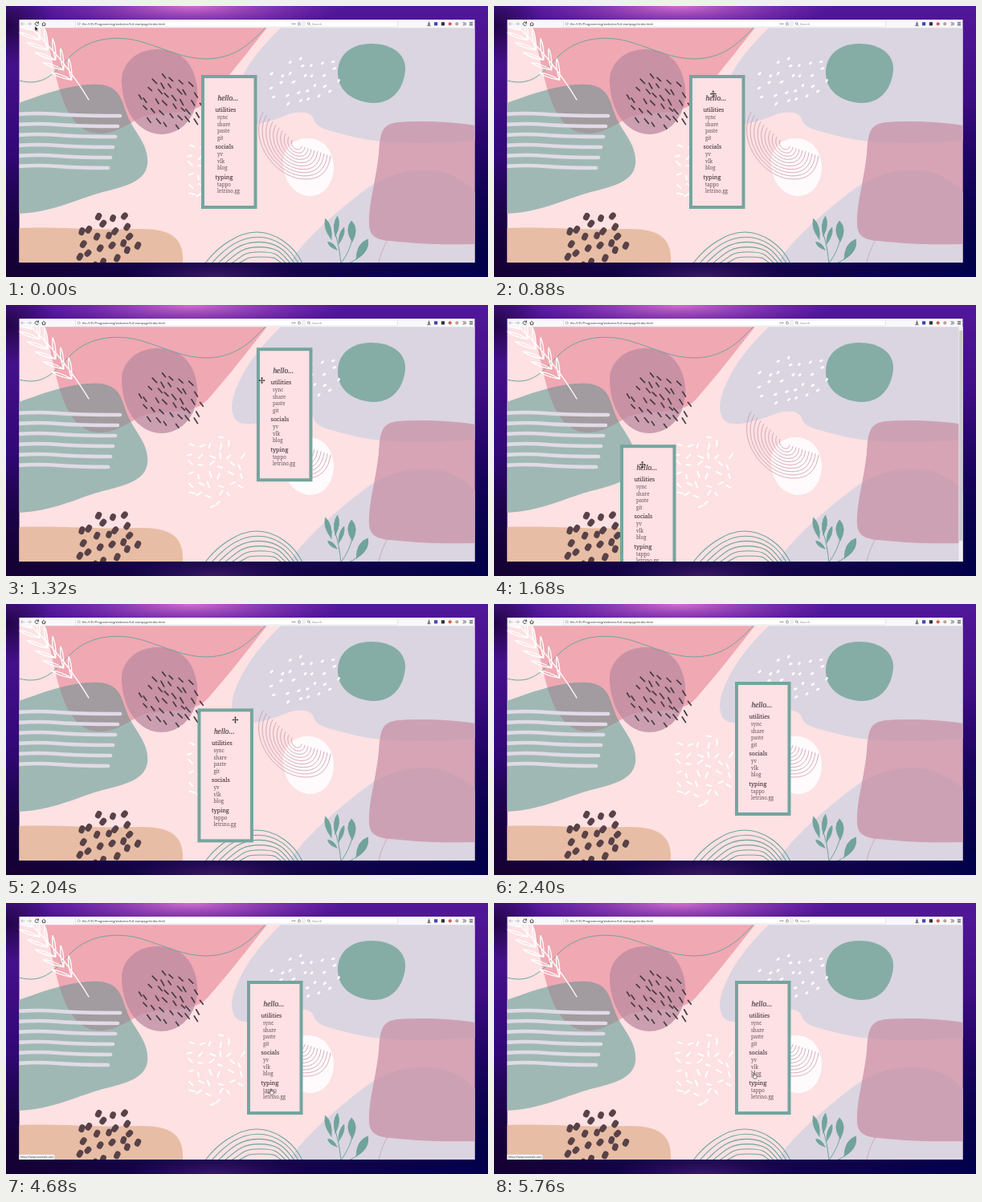
An HTML page that plays this animation: 600x338 px, repeating every 5800 ms.

```html
<!DOCTYPE html>
<html lang="en">
<head>
<meta charset="utf-8">
<title>Start page</title>
<style>
html, body { margin: 0; width: 100%; height: 100%; overflow: hidden; background: #180652; }
svg { display: block; width: 100vw; height: 100vh; }
.ui { font: 3.85px "Open Sans", "Noto Sans", sans-serif; fill: #333; }
.hello { font: italic 9.3px "Liberation Serif", serif; fill: #3f3338; stroke: #3f3338; stroke-width: .15; }
.head { font: 7.2px "Noto Serif", serif; fill: #4a363c; stroke: #4a363c; stroke-width: .1; }
.link { font: 6.2px "Noto Serif", serif; fill: #66525a; }
.line { fill: none; stroke-linecap: round; stroke-linejoin: round; }
</style>
</head>
<body>
<svg viewBox="0 0 600 338" preserveAspectRatio="none">
  <defs>
    <linearGradient id="sky" x2="0" y2="1">
      <stop offset="0" stop-color="#52179a"/><stop offset=".5" stop-color="#34087a"/><stop offset="1" stop-color="#120446"/>
    </linearGradient>
    <radialGradient id="glow"><stop offset="0" stop-color="#d070cc"/><stop offset="1" stop-color="#a040c0" stop-opacity="0"/></radialGradient>
    <radialGradient id="navy"><stop offset="0" stop-color="#02004a"/><stop offset="1" stop-color="#02004a" stop-opacity="0"/></radialGradient>
    <radialGradient id="dusk"><stop offset="0" stop-color="#150032"/><stop offset="1" stop-color="#150032" stop-opacity="0"/></radialGradient>
    <clipPath id="page"><path d="M16.5 27H583.5V320H16.5Z"/></clipPath>
    <path id="salmon" d="M48 27H325C302 56 276 90 250 119C233 138 190 130 168 139C148 149 136 160 114 159C76 156 66 104 58 70Q54 50 48 27Z"/>
    <path id="sage" d="M16 121C42 112 82 96 116 98C142 100 144 118 150 134C157 155 179 172 176 198C172 223 140 226 110 235C80 245 55 257 16 259Z"/>
    <clipPath id="inSalmon"><use href="#salmon"/></clipPath>
  </defs>

  <rect width="600" height="338" fill="url(#sky)"/>
  <ellipse cx="230" cy="0" rx="190" ry="32" fill="url(#glow)"/>
  <ellipse cx="0" cy="25" rx="60" ry="50" fill="url(#dusk)" opacity=".8"/>
  <ellipse cx="0" cy="338" rx="190" ry="150" fill="url(#dusk)"/>
  <ellipse cx="600" cy="320" rx="230" ry="210" fill="url(#navy)"/>
  <ellipse cx="260" cy="338" rx="110" ry="24" fill="url(#glow)" opacity=".2"/>

  <g clip-path="url(#page)">
    <rect x="16" y="27" width="568" height="294" fill="#fde1e3"/>
    <path fill="#dad5e1" d="M342 27C322 47 305 66 293 90C282 111 278 128 284 140C292 157 330 144 352 135C369 130 380 133 383 141C386 153 402 155 424 161C455 170 500 174 584 168V27Z"/>
    <path fill="#dad5e1" d="M352 321C370 293 405 262 446 230C477 206 522 198 552 210Q573 219 584 232V321Z"/>
    <use href="#salmon" fill="#f0a8b3"/>
    <use href="#sage" fill="#a0b8b4"/>
    <use href="#sage" fill="#a29b9f" clip-path="url(#inSalmon)"/>
    <path fill="#bd8ba0" opacity=".76" d="M144 95C143 70 165 53 190 54C220 56 234 72 238 101C241 133 222 160 193 160C163 159 145 129 144 95Z"/>
    <path fill="#e8bda5" d="M16 277C60 275 115 280 168 278C209 278 222 292 220 321H16Z"/>
    <path fill="#85ada6" d="M413 85C412 61 430 47 454 47C481 47 498 60 497 80C495 105 479 122 456 121C431 119 414 106 413 85Z"/>
    <path fill="#fffbfc" d="M345 197C344 177 360 164 377 165C397 166 408 182 408 202C407 222 396 237 378 237C358 235 346 219 345 197Z"/>
    <g id="art" class="line"></g>
    <path fill="#c98fa5" opacity=".74" d="M490 145C466 146 466 160 464 184C461 215 452 245 452 265C451 284 456 291 478 293C515 297 550 298 584 297V149C555 144 515 143 490 145Z"/>
    <path class="line" stroke="#cf9fb0" stroke-width=".8" d="M464 320C471 287 493 264 520 254Q552 243 584 257"/>

    <g id="panel">
      <rect x="2" y="2" width="65.5" height="163" fill="#fde1e4" stroke="#74a59f" stroke-width="4"/>
      <text class="hello" x="20.5" y="31.5">hello...</text>
    </g>
    <g id="scroll"><path fill="#f1f0f1" d="M578.5 27H584V320.5H578.5Z"/><path fill="#cbcacc" d="M579.2 32H583.3V294H579.2Z"/></g>
    <g id="status">
      <path fill="#f9f9fa" stroke="#c8c8cc" stroke-width=".5" d="M16 313.8H59Q60.5 313.8 60.5 315.3V321H16Z"/>
      <text class="ui" x="18" y="318.4" style="font-size:3.4px">https://www.example.com</text>
    </g>
  </g>

  <g id="toolbar">
    <path fill="#f8f8fa" d="M16.5 17H583.5V27.3H16.5Z"/>
    <path fill="#fff" stroke="#cfcfd4" stroke-width=".5" d="M86.5 18.3H369.5V26H86.5ZM372 18.3H487.5V26H372Z"/>
    <path class="line" stroke="#aaa" stroke-width=".7" d="M23 22.3H18.7L20.5 20.5M18.7 22.3L20.5 24.1M27 22.3H31.3L29.5 20.5M31.3 22.3L29.5 24.1"/>
    <g class="line" stroke="#333" stroke-width=".8">
      <path d="M40.2 21A2.2 2.2 0 1 0 40.4 23.2M40.5 19.8V21.4H38.9M44.8 22.5L47 20.2L49.2 22.5M45.5 22.5V24.6H48.5V22.5"/>
      <path d="M524.8 24.6H528.2M526.5 20V23.5L525.2 22.2M526.5 23.5L527.8 22.2M569 20.5L570.6 22.3L569 24.1M571 20.5L572.6 22.3L571 24.1M577.3 20.6H580.7M577.3 22.3H580.7M577.3 24H580.7"/>
      <circle cx="90.5" cy="22.2" r="1.6" stroke="#777" stroke-width=".5"/>
      <circle cx="376.5" cy="21.8" r="1.3" stroke="#777" stroke-width=".6"/><path stroke="#777" d="M377.5 22.8L378.5 24"/>
      <path stroke="#666" stroke-width=".5" d="M365 20.4L365.6 21.7L367 21.9L366 22.8L366.2 24.2L365 23.5L363.8 24.2L364 22.8L363 21.9L364.4 21.7Z"/>
    </g>
    <path fill="#444" d="M355.7 21.8h1v1h-1zM357.5 21.8h1v1h-1zM359.3 21.8h1v1h-1z"/>
    <path fill="#4146b0" d="M533 20.2h4.2v4.2h-4.2z"/><path fill="#333" d="M541.8 20.2h4.2v4.2h-4.2z"/>
    <circle cx="552.7" cy="22.3" r="2.1" fill="#d0604c"/><circle cx="561.3" cy="22.3" r="2.1" fill="#b9a190"/>
    <text class="ui" x="95" y="23.7">file:///D:/Programming/websites/full-startpage/index.html</text>
    <text class="ui" x="381" y="23.7" style="fill:#888">Search</text>
  </g>

  <g id="cursor">
    <path id="arrow" fill="#111" stroke="#fff" stroke-width=".5" d="M0 0V6.2L1.5 4.9L2.5 7.1L3.5 6.6L2.5 4.5H4.5Z"/>
    <path id="move" class="line" stroke="#222" stroke-width=".8" d="M0-3.6V3.6M-3.2 0H3.2M-1-2.6L0-3.6L1-2.6M-1 2.6L0 3.6L1 2.6M-2.4-.8L-3.2 0L-2.4 .8M2.4-.8L3.2 0L2.4 .8"/>
    <path id="hand" fill="#fff" stroke="#222" stroke-width=".6" d="M-.7 0Q0-.8 .6 0V2.5L3.2 3.2V5.3L2.5 7H-.5L-2.3 4.2L-1.6 3.6L-.7 4.3Z"/>
  </g>
</svg>
<script>
const $ = id => document.getElementById(id);
const add = (parent, tag, attrs, text = "") => {
  const el = parent.appendChild(document.createElementNS("http://www.w3.org/2000/svg", tag));
  for (const key in attrs) el.setAttribute(key, attrs[key]);
  el.textContent = text;
  return el;
};
const line = (d, stroke, width, fill = "none") => add($("art"), "path", { d, stroke, fill, "stroke-width": width });
const mix = (a, b, t) => a + (b - a) * t;
const TEAL = "#6fa39b";

let seed = 11;
const rand = () => (seed = (seed * 16807) % 2147483647) / 2147483647;
const jitter = size => (rand() - .5) * size;

// Jittered grid of short strokes inside a tilted ellipse
function scatter({ cx, cy, rx, ry, tilt = 0, step, length, angle, spread, color, width }) {
  let d = "";
  for (let v = -ry; v <= ry; v += step)
    for (let u = -rx; u <= rx; u += step) {
      const a = u + jitter(step * .5), b = v + jitter(step * .5);
      if ((a / rx) ** 2 + (b / ry) ** 2 > 1) continue;
      const x = cx + a * Math.cos(tilt) - b * Math.sin(tilt);
      const y = cy + a * Math.sin(tilt) + b * Math.cos(tilt);
      const turn = angle + jitter(spread), half = length * (1 + jitter(.4)) / 2;
      const dx = Math.cos(turn) * half, dy = Math.sin(turn) * half;
      d += `M${x - dx} ${y - dy}L${x + dx} ${y + dy}`;
    }
  line(d, color, width);
}

// Pointed leaf growing from (x, y) at an angle in degrees
function leaf(x, y, degrees, length, bulge) {
  const a = degrees * Math.PI / 180, dx = Math.cos(a) * length, dy = Math.sin(a) * length;
  const side = s => `${x + dx * .6 - dy * bulge * s} ${y + dy * .6 + dx * bulge * s}`;
  return `M${x} ${y}Q${side(1)} ${x + dx} ${y + dy}Q${side(-1)} ${x} ${y}Z`;
}

function drawSpray() {
  let d = "M103 117Q75 70 32 28";
  for (let t = .3; t <= 1; t += .14) {
    const x = mix(103, 32, t), y = mix(117, 28, t) + 2;
    d += leaf(x, y, 200, 27, .12) + leaf(x, y, 262, 27, .12);
  }
  line(d, "#fff", 1.3);
}

function drawStripes() {
  for (let i = 0; i < 6; i++) {
    const y = 135 + 13 * i;
    line(`M14 ${y}Q40 ${y - 2} 65 ${y}T${142 - 3 * i} ${y + 2}`, "#e0dbe6", 4.7);
  }
}

function drawRipples() {
  for (let i = 0; i < 10; i++) {
    const x = v => mix(v, 362, i / 10.5), y = v => mix(v, 173, i / 10.5);
    line(`M${x(320)} ${y(133)}C${x(301)} ${y(166)} ${x(334)} ${y(215)} ${x(372)} ${y(216)}Q${x(400)} ${y(217)} ${x(404)} ${y(187)}`, "#cd98a7", .8);
  }
}

function drawHills() {
  for (let i = 0; i < 6; i++) {
    const left = 248 + i * 8, right = 369 - i * 5, top = 282 + i * 6.2, mid = mix(left, right, .53);
    line(`M${left} 321C${left + 14} ${mix(top, 321, .5)} ${mid - 24} ${top} ${mid} ${top}S${right - 10} ${mix(top, 321, .45)} ${right} 321`, TEAL, 1.1);
  }
}

function drawPlant() {
  line("M417 321Q415 300 410 284M417 321Q429 304 431 290M426 321Q435 318 439 312", TEAL, 1);
  const leaves = leaf(410, 287, -84, 25, .24) + leaf(405, 291, -106, 27, .24) + leaf(412, 304, -140, 15, .3)
    + leaf(414, 297, -72, 22, .22) + leaf(431, 294, -92, 26, .36) + leaf(436, 316, -60, 29, .34);
  line(leaves, TEAL, .8, TEAL);
}

line("M16 93C50 102 62 80 82 61C105 39 140 36 170 45C202 55 222 66 250 66C285 65 303 48 323 27", TEAL, 1);
drawStripes();
drawSpray();
scatter({ cx: 206, cy: 118, rx: 41, ry: 38, tilt: .3, step: 11.2, length: 7, angle: .9, spread: .3, color: "#463b43", width: 1.7 });
scatter({ cx: 259, cy: 207, rx: 42, ry: 45, step: 12.5, length: 6, angle: .8, spread: 3.2, color: "#fff", width: 2 });
scatter({ cx: 369, cy: 93, rx: 50, ry: 28, tilt: -.25, step: 13, length: 2.2, angle: -.7, spread: .7, color: "#fff", width: 2.6 });
scatter({ cx: 427, cy: 75, rx: 10, ry: 1, step: 18, length: 2.5, angle: -.5, spread: .4, color: "#fff", width: 2.4 });
scatter({ cx: 127, cy: 290, rx: 44, ry: 33, tilt: -.4, step: 14.5, length: 2.6, angle: -1.1, spread: .6, color: "#584248", width: 7.2 });
drawRipples();
drawHills();
drawPlant();

const menu = {
  utilities: ["sync", "share", "paste", "git"],
  socials: ["yv", "vlk", "blog"],
  typing: ["tappo", "letrino.gg"],
};
const links = [];
let rowY = 46;
for (const [title, labels] of Object.entries(menu)) {
  add($("panel"), "text", { class: "head", x: 17.5, y: rowY }, title);
  rowY += .4;
  for (const label of labels) {
    rowY += 8.55;
    links.push({ y: rowY, text: add($("panel"), "text", { class: "link", x: 20, y: rowY }, label) });
  }
  rowY += 11.5;
}

// Eases through stops written as [start, end, x, y]; each stop is reached at its end time
function travel([x, y], stops, t) {
  for (const [start, end, nx, ny] of stops) {
    const p = Math.min(1, Math.max(0, (t - start) / (end - start))), s = p * p * (3 - 2 * p);
    x = mix(x, nx, s);
    y = mix(y, ny, s);
  }
  return [x, y];
}

const GRAB = 900, DROP = 2320, LEAD = 60;
const panelAt = t => travel([243, 86], [[GRAB, 1240, 318, 48.5], [1270, 1700, 156, 175], [1700, DROP, 300, 97]], t);
const approach = t => travel([36, 25], [[120, 800, 270, 111]], t);
const browse = t => travel([327, 122], [[2500, 2900, 342, 133], [2900, 3440, 323, 150], [3600, 4200, 330, 232],
  [4800, 5400, 323, 196], [5440, 5720, 324, 212]], t);

// The pointer runs a little ahead of the panel it drags
function cursorAt(t) {
  if (t < GRAB - LEAD) return approach(t);
  if (t > DROP) return browse(t);
  const [x, y] = panelAt(t + LEAD);
  return [x + 27, y + 25];
}

const show = (id, on) => $(id).setAttribute("visibility", on ? "inherit" : "hidden");
const place = (id, [x, y]) => $(id).setAttribute("transform", `translate(${x} ${y})`);

function render(t) {
  const panel = panelAt(t), cursor = cursorAt(t);
  const dx = cursor[0] - panel[0], dy = cursor[1] - panel[1];
  place("panel", panel);
  place("cursor", cursor);

  let hovered = false;
  for (const { text, y } of links) {
    const on = t > DROP && Math.abs(dy - y + 2) < 4.2;
    text.setAttribute("text-decoration", on ? "underline" : "none");
    hovered ||= on;
  }
  const dragging = t > GRAB && t < DROP;
  const overPanel = dragging || dx > 0 && dx < 70 && dy > 0 && dy < 167;
  show("hand", hovered);
  show("move", !hovered && overPanel);
  show("arrow", !hovered && !overPanel);
  show("cursor", t <= DROP || t > 2440);
  show("status", hovered && t > 3560);
  show("scroll", panel[1] + 167 > 320);
}

const start = performance.now();
function tick(now) {
  const t = Math.max(0, now - start) % 5800;
  render(Math.floor(t / 40) * 40);
  requestAnimationFrame(tick);
}
render(0);
requestAnimationFrame(tick);
</script>
</body>
</html>
```
